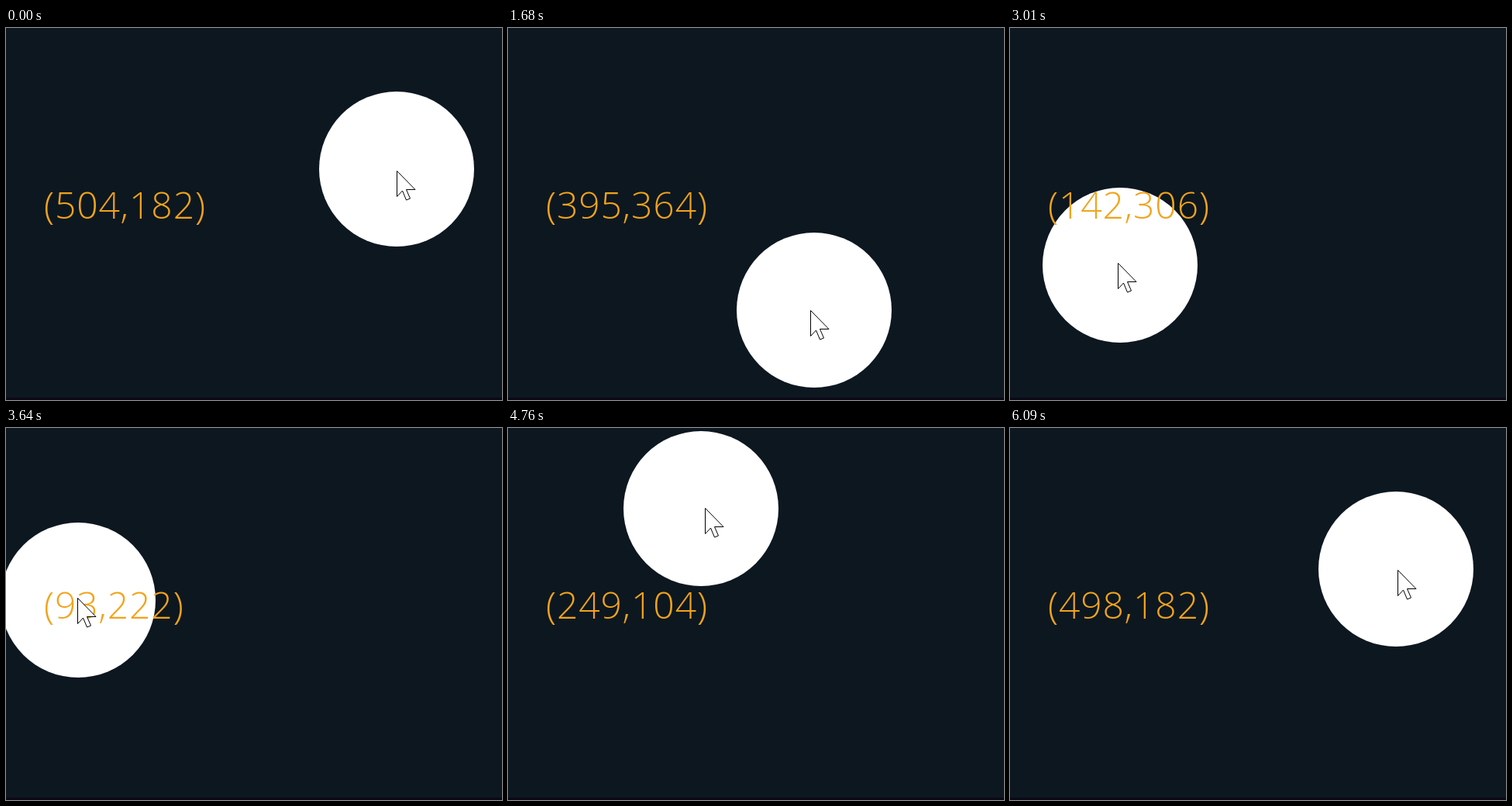
Write an HTML page with a canvas that moves like this. It is 640x480 px and loops after 6.16 s.

```html
<!DOCTYPE html>
<html lang="en">
<head>
<meta charset="utf-8">
<title>Circle follows pointer</title>
<style>
html, body { margin: 0; width: 100%; height: 100%; overflow: hidden; background: #0d1720; }
canvas { display: block; }
</style>
</head>
<body>
<canvas id="stage" width="640" height="480"></canvas>
<script>
const ctx = document.getElementById('stage').getContext('2d');
const LOOP = 6160, STEP = 70, LEAD = 21, RADIUS = 100;

// The hand sweeps through these points at even intervals
const path = [
  [504, 182], [515, 278], [421, 357], [255, 366], [134, 298],
  [96, 194], [216, 108], [414, 124], [506, 188]
];
const last = path.length - 1;
const arrow = new Path2D('M.5.5v33l7-7.5 5 12 5-2-5-11.5h11.5z');

function slope(i, axis) {
  const a = Math.max(0, i - 1), b = Math.min(last, i + 1);
  return (path[b][axis] - path[a][axis]) / (b - a);
}

// Catmull-Rom spline through the points
function along(t, axis) {
  const s = t / LOOP * last;
  const i = Math.min(last - 1, Math.floor(s));
  const u = s - i, v = 1 - u;
  return v * v * (1 + 2 * u) * path[i][axis]
    + u * u * (3 - 2 * u) * path[i + 1][axis]
    + u * v * (v * slope(i, axis) - u * slope(i + 1, axis));
}

const spot = t => [along(t, 0), along(t, 1)];

function drawPointer(x, y) {
  ctx.save();
  ctx.translate(x, y);
  ctx.fillStyle = '#fff';
  ctx.fill(arrow);
  ctx.strokeStyle = '#000';
  ctx.stroke(arrow);
  ctx.restore();
}

function draw(t) {
  const [x, y] = spot(t).map(Math.round);
  ctx.fillStyle = '#0d1720';
  ctx.fillRect(0, 0, 640, 480);
  ctx.fillStyle = '#0b0815';
  ctx.fillRect(0, 477, 640, 3);

  ctx.fillStyle = '#fff';
  ctx.beginPath();
  ctx.arc(x, y, RADIUS, 0, Math.PI * 2);
  ctx.fill();

  ctx.font = '350 48px "Open Sans", "Noto Sans", sans-serif';
  ctx.letterSpacing = '0.9px';
  ctx.fillStyle = '#f0a41c';
  ctx.fillText(`(${x},${y})`, 49, 246);

  // The pointer runs slightly ahead of the circle
  drawPointer(...spot(t + LEAD).map(Math.floor));
}

function tick() {
  const t = performance.now() % LOOP;
  draw(Math.floor(t / STEP) * STEP);
  requestAnimationFrame(tick);
}
tick();
</script>
</body>
</html>
```
